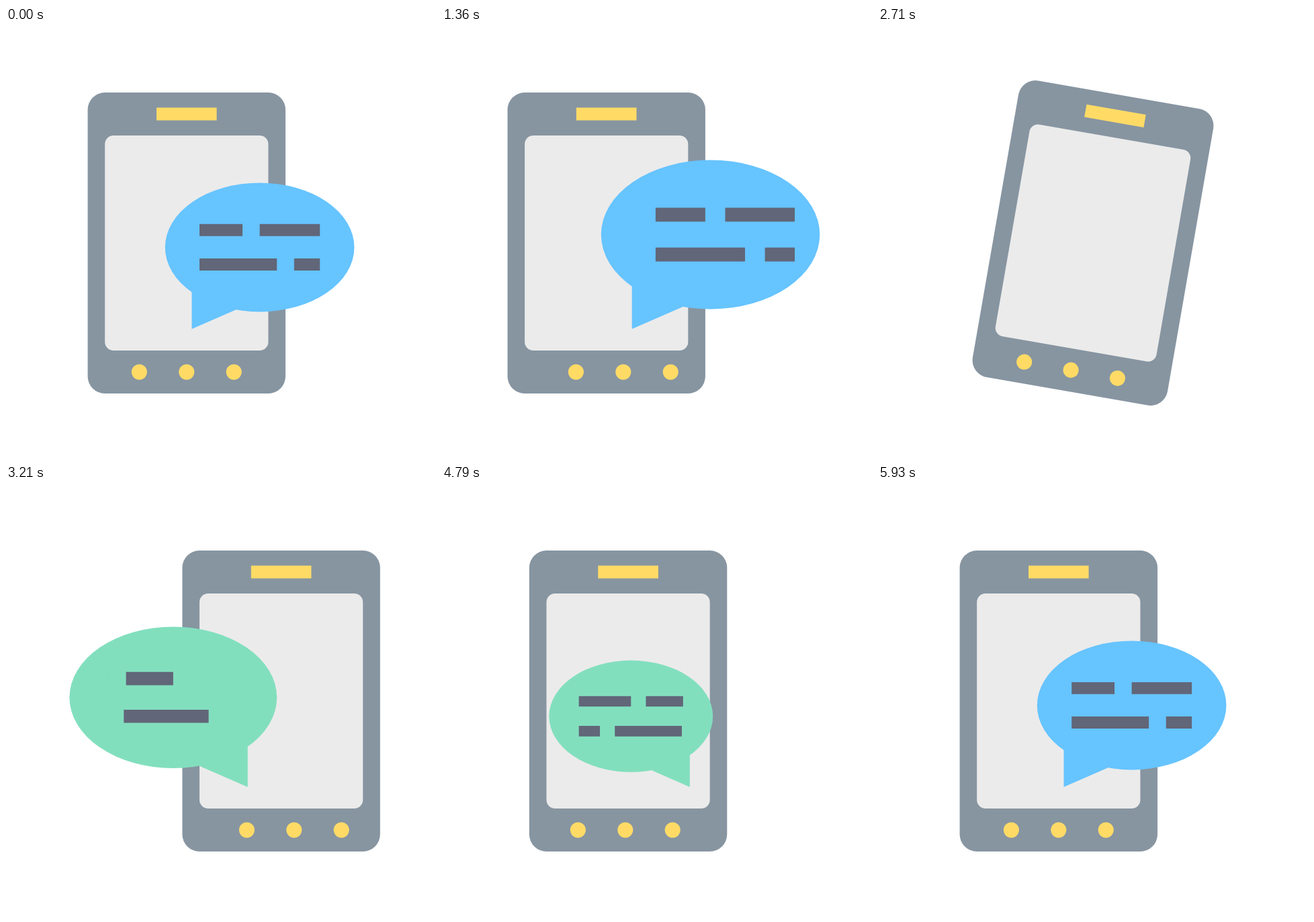
Write an HTML page with a canvas that moves like this. It is 640 px wide and 640 px high and loops after 6 s.

```html
<!DOCTYPE html>
<html lang="en">
<head>
<meta charset="utf-8">
<title>Phone chat</title>
<style>
  html, body { margin: 0; width: 100%; height: 100%; overflow: hidden; background: #fff; }
  canvas { display: block; }
</style>
</head>
<body>
<canvas id="stage" width="640" height="640"></canvas>
<script>
const ctx = document.getElementById('stage').getContext('2d');
const LOOP = 6000;
const UNIT = 640 / 500; // drawn on a 500-unit grid
const GREY = '#8795a1', YELLOW = '#ffdb66', SCREEN = '#ebebeb';
const BLUE = '#66c4ff', GREEN = '#82dfbe', INK = '#616678';
let time = 0;

const span = (from, to) => Math.min(1, Math.max(0, (time - from) / (to - from)));
const easeInOut = x => x < 0.5 ? 4 * x ** 3 : 1 - 4 * (1 - x) ** 3;
const step = (from, to) => easeInOut(span(from, to));
// From 0 to 1 by way of a turning point beyond either end.
const swing = (from, turn, to, via) => via * step(from, turn) + (1 - via) * step(turn, to);
// Out to 1 and back to 0.
const pulse = (from, turn, to) => step(from, turn) - step(turn, to);

function phoneX() {
  return 210 + 40 * swing(570, 1310, 1610, -0.5)
    + 40 * swing(2900, 3205, 3720, 1.75)
    - 80 * swing(4453, 5078, 5710, 1.5);
}

function dotShift() {
  return 20 * pulse(300, 1310, 1610) + 15 * pulse(2900, 3205, 3720)
    - 15 * pulse(4600, 5100, 5710);
}

// Alternating tilts, each turning where the next begins.
function phoneAngle() {
  const turns = [1610, 1840, 2083, 2250, 2464, 2679, 2900];
  let angle = 0;
  for (let i = 0; i + 2 < turns.length; i++) {
    angle += (i % 2 ? -10 : 10) * pulse(turns[i], turns[i + 1], turns[i + 2]);
  }
  return angle;
}

function blueScale() {
  return 1 + 0.25 * step(590, 1000) - 1.25 * span(1000, 1855) ** 3 + step(5180, 5720);
}

function greenScale() {
  return swing(2950, 3330, 4010, 1.25) - step(4604, 5184);
}

function box(color, x, y, w, h, r = 0) {
  ctx.fillStyle = color;
  ctx.beginPath();
  ctx.roundRect(x, y, w, h, r);
  ctx.fill();
}

function phone() {
  ctx.save();
  ctx.translate(phoneX(), 250);
  ctx.rotate(phoneAngle() * Math.PI / 180);
  box(GREY, -115, -175, 230, 350, 20);
  box(SCREEN, -95, -125, 190, 250, 10);
  box(YELLOW, -35, -157.5, 70, 15);
  for (const x of [-55, 0, 55]) box(YELLOW, x + dotShift() - 9, 141, 18, 18, 9);
  ctx.restore();
}

// The bubble grows from its outer bottom corner; side is 1 or -1 for the tail direction.
function bubble(color, anchorX, side, scale, drawText) {
  if (scale < 0.001) return;
  ctx.save();
  ctx.translate(anchorX, 350);
  ctx.scale(scale, scale);
  ctx.save();
  ctx.scale(side, 1);
  ctx.fillStyle = color;
  ctx.beginPath();
  ctx.ellipse(110, -95, 110, 75, 0, 0, Math.PI * 2);
  ctx.fill();
  ctx.beginPath();
  ctx.moveTo(31, -50);
  ctx.lineTo(31, 0);
  ctx.lineTo(82.5, -22.5);
  ctx.lineTo(82.5, -50);
  ctx.fill();
  ctx.restore();
  ctx.translate(side * 110, -95);
  drawText();
  ctx.restore();
}

// Two words with a fixed gap, set from the left margin of the text.
function line(y, first, second) {
  if (first > 0) box(INK, -70, y, first, 14);
  box(INK, -50 + first, y, second, 14);
}

function greenText() {
  line(-27, 70 * step(3180, 3980), 50);
  line(13, -2.4 + 32.4 * step(4180, 4980), 90);
}

function blueText() {
  const size = time < LOOP / 2 ? 1 : step(5250, 5990);
  ctx.translate(14.8 * pulse(0, 1340, 6000), 0);
  ctx.scale(size, size);
  line(-27, 50, 70);
  line(13, 90, 30);
}

function frame() {
  time = performance.now() % LOOP;
  ctx.setTransform(1, 0, 0, 1, 0, 0);
  ctx.fillStyle = '#fff';
  ctx.fillRect(0, 0, 640, 640);
  ctx.scale(UNIT, UNIT);
  phone();
  bubble(GREEN, 315, -1, greenScale(), greenText);
  bubble(BLUE, 185, 1, blueScale(), blueText);
  requestAnimationFrame(frame);
}
frame();
</script>
</body>
</html>
```
